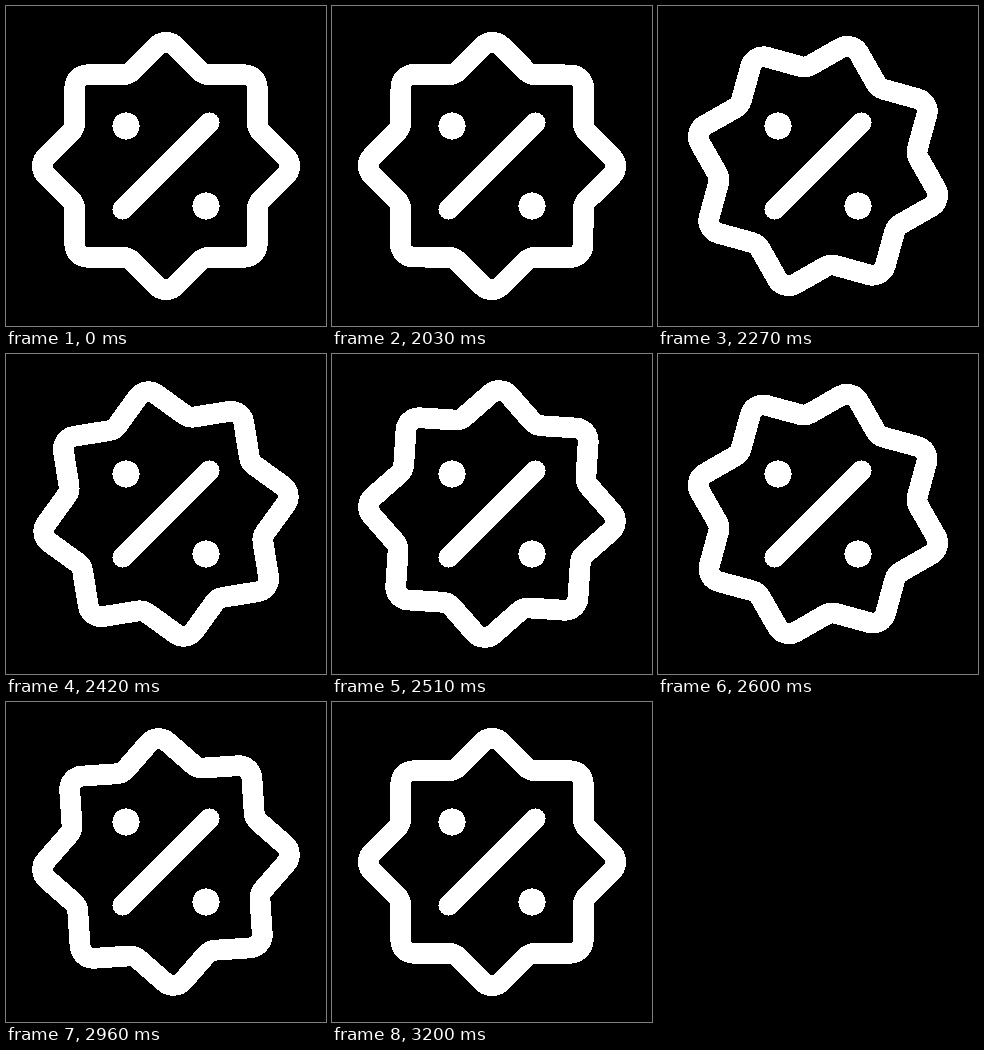
An HTML page for the animation above (3230 ms loop, 320 by 320 pixels).

```html
<!DOCTYPE html>
<html lang="en">
<head>
<meta charset="utf-8">
<title>Discount badge</title>
<style>
  @property --turn { syntax: "<angle>"; inherits: false; initial-value: 0deg; }
  html, body { margin: 0; width: 100%; height: 100%; overflow: hidden; background: #000; }
  svg { display: block; width: 100%; height: 100%; shape-rendering: crispEdges; }
  .line { fill: none; stroke: #fff; stroke-width: 20.6; stroke-linecap: round; }
  .dot { fill: #fff; }
  #badge { stroke-width: 20.8; transform-origin: 160px 160px; transform: rotate(var(--turn)); }
</style>
</head>
<body>
<svg viewBox="0 0 320 320">
  <path id="badge" class="line"/>
  <path class="line" d="M116.67 203.33L203.33 116.67"/>
  <circle class="dot" cx="120" cy="120" r="13.6"/>
  <circle class="dot" cx="200" cy="200" r="13.6"/>
</svg>
<script>
const CENTER = 160, HALF = 91.3, RADIUS = 13.2;
const LOOP = 3230, START = 2000, TURN = 1200, STEP = 30, ANGLE = 90;

// Outline of two crossed squares, every corner rounded.
function starPath() {
  const tip = HALF * Math.SQRT2, notch = HALF / Math.cos(Math.PI / 8);
  const vertex = k => {
    const a = k * Math.PI / 8, r = k % 2 ? notch : tip;
    return [CENTER + r * Math.cos(a), CENTER + r * Math.sin(a)];
  };
  const toward = ([x, y], [u, v], d) => {
    const f = d / Math.hypot(u - x, v - y);
    return [x + (u - x) * f, y + (v - y) * f].map(n => n.toFixed(2)).join(" ");
  };
  let d = "";
  for (let k = 0; k < 16; k++) {
    const p = vertex(k), isNotch = k % 2;
    const cut = isNotch ? RADIUS * Math.tan(Math.PI / 8) : RADIUS;
    d += (k ? "L" : "M") + toward(p, vertex(k + 15), cut);
    d += `A${RADIUS} ${RADIUS} 0 0 ${isNotch ? 0 : 1} ` + toward(p, vertex(k + 1), cut);
  }
  return d + "Z";
}

// cubic-bezier(.34, 0, .4, 1)
function ease(x) {
  let lo = 0, hi = 1;
  for (let i = 0; i < 30; i++) {
    const s = (lo + hi) / 2, q = 1 - s;
    if (3 * q * q * s * 0.34 + 3 * q * s * s * 0.4 + s * s * s < x) lo = s;
    else hi = s;
  }
  return lo * lo * (3 - 2 * lo);
}

const badge = document.getElementById("badge");
badge.setAttribute("d", starPath());

// Turning through a custom property keeps the edges crisp.
const pose = (time, angle) => ({
  offset: time / LOOP,
  "--turn": `${angle}deg`,
  easing: "step-end"
});
const frames = [pose(0, 0)];
for (let t = STEP; t <= TURN; t += STEP) {
  frames.push(pose(START + t, ANGLE * ease(t / TURN)));
}
frames.push(pose(LOOP, ANGLE));

// The small head start keeps poses settled at exact step times.
badge.animate(frames, { duration: LOOP, delay: -1, iterations: Infinity });
</script>
</body>
</html>
```
